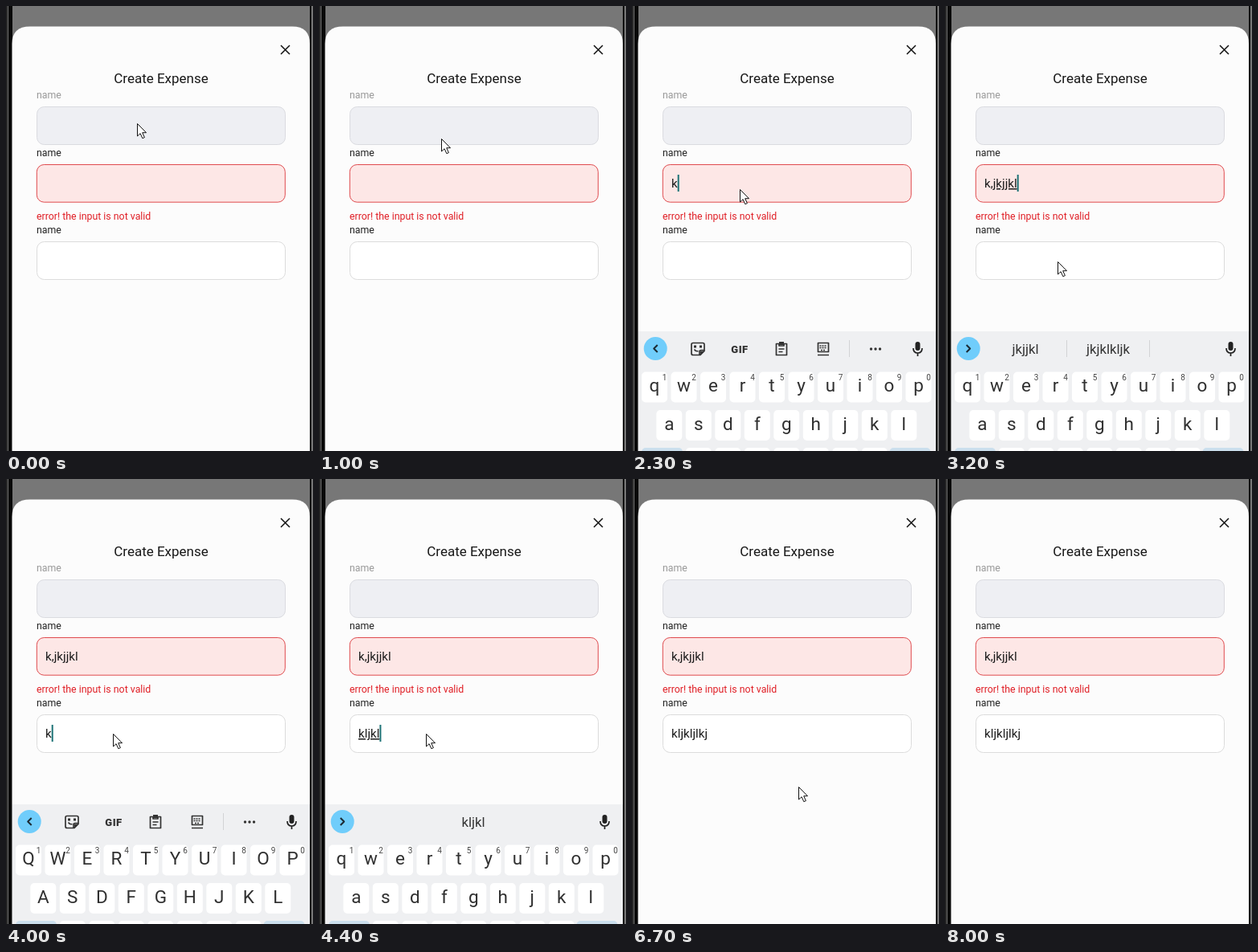
An HTML page for the animation above (8.5 s loop, 382 by 554 pixels).

```html
<!DOCTYPE html>
<html lang="en">
<head>
<meta charset="utf-8">
<title>Create Expense</title>
<style>
  html, body { margin: 0; width: 100%; height: 100%; overflow: hidden; }
  svg { display: block; width: 382px; height: 554px; font-family: Roboto, sans-serif; font-size: 12.35px; }
  .field { rx: 9px; stroke-width: 1; }
  .input { font-size: 15.2px; fill: #1c1c1c; }
  .composing { text-decoration: underline 1px; }
  .mid { text-anchor: middle; }
  .letters { font-size: 22.5px; fill: #303030; }
  .digits { font-size: 10px; fill: #444; }
  .hint { font-size: 16.8px; fill: #333; }
  .line { fill: none; stroke: #333; stroke-width: 1.7; stroke-linejoin: round; }
</style>
</head>
<body>
<svg viewBox="0 0 382 554">
  <rect width="382" height="554" fill="#777"/>
  <rect width="8" height="554" fill="#080808"/>
  <rect width="1.5" height="554" fill="#303030"/>
  <rect x="2" width="1" height="554" fill="#777"/>
  <path d="M7.500 554V47Q7.500 25.500 30 25.500H356Q378 25.500 378 47V554Z" fill="#fcfcfc"/>
  <rect x="378" width="2" height="554" fill="#111"/>

  <path d="M342 49l11 11m0-11l-11 11" class="line" style="stroke:#111;stroke-width:1.500"/>
  <text x="193" y="96" class="mid" font-size="17" fill="#181818">Create Expense</text>
  <g fill="#222">
    <text x="38" y="114.5" fill="#999">name</text>
    <text x="38" y="186.5">name</text>
    <text x="38" y="265.5" fill="#e01f26">error! the input is not valid</text>
    <text x="38" y="282.5">name</text>
  </g>
  <rect class="field" x="38.5" y="125.5" width="309" height="47" fill="#eeeff3" stroke="#dadbe0"/>
  <rect class="field" x="38.3" y="197.5" width="309" height="46.7" fill="#fde7e6" stroke="#df4a4e"/>
  <rect class="field" x="38.5" y="293.5" width="309" height="47" fill="#fff" stroke="#dcdcdc"/>
  <text class="input" x="49" y="226"><tspan></tspan><tspan></tspan></text>
  <text class="input" x="49" y="322"><tspan></tspan><tspan></tspan></text>
  <rect id="caret" width="2" height="21" fill="#1d7376"/>

  <g id="keyboard">
    <rect x="8" y="405" width="370" height="150" fill="#eff0f2"/>
    <circle cx="29.2" cy="426.5" r="14.5" fill="#70cdfb"/>
    <path id="chevron" class="line" d="M2.500 -4.500l-4.500 4.500 4.500 4.500" style="stroke:#1c2a33;stroke-width:2"/>
    <g id="tools">
      <path class="line" d="M76 419.500h12q2 0 2 2v8l-5 5h-9q-2 0-2-2v-11q0-2 2-2zM90 428.500h-4q-2 0-2 2v4M77.500 427.500q2 3 5 2"/>
      <path d="M77 422.500h3v3h-3zM84 422.500h3v3h-3zM85 434.500v-5h5z" fill="#333"/>
      <text x="134" y="431.5" class="mid" font-size="13" font-weight="900" letter-spacing=".5" fill="#333">GIF</text>
      <path class="line" d="M179.500 420.500h13v14h-13zM183 420v3h6v-3M182.500 427h7M182.500 430.500h5"/>
      <path d="M183 418h6v4h-6z" fill="#333"/>
      <path class="line" d="M231.500 419.500h13v11h-13zM231 434.500h14"/>
      <path class="line" stroke-dasharray="2 1" d="M233.500 423h9M233.500 425.500h9M235 428.500h6"/>
      <path d="M270.500 416v21" stroke="#d2d3d5"/>
      <path d="M297.500 427h.01m5.500 0h.01m5.500 0h.01" stroke="#333" stroke-width="3.400" stroke-linecap="round"/>
    </g>
    <g id="hints" class="hint mid">
      <path d="M151.500 416v21M254.500 416v21" stroke="#d2d3d5"/>
      <text y="433"></text>
      <text x="203" y="433">jkjklkljk</text>
    </g>
    <rect x="352.500" y="418" width="6" height="11" rx="3" fill="#222"/>
    <path class="line" d="M350 426q0 6 5.500 6t5.500-6M355.500 432v4" style="stroke:#222"/>
    <g id="keys"></g>
    <g id="letters" class="letters mid"></g>
    <g id="digits" class="digits mid"></g>
  </g>
  <path id="pointer" d="M.5 .5V16l3.600-3.300 2.700 6 2.600-1.100-2.700-5.900h4.800z" fill="#fff" stroke="#111"/>
</svg>
<script>
const $ = id => document.getElementById(id);
const inputs = document.querySelectorAll('.input');
const hintTexts = $('hints').querySelectorAll('text');
const LOOP = 8500, STEP = 100, PITCH = 36.5;
const HIDDEN = 160;

function add(parent, tag, attrs, text = '') {
  const node = document.createElementNS('http://www.w3.org/2000/svg', tag);
  for (const name in attrs) node.setAttribute(name, attrs[name]);
  node.textContent = text;
  parent.append(node);
}

function addKey(x, y, width, fill) {
  add($('keys'), 'rect', { x, y, width, height: 38, rx: 5, fill });
}

[['qwertyuiop', 28, 455.5], ['asdfghjkl', 46.3, 503], ['zxcvbnm', 82.8, 550]].forEach(([row, left, y], r) => {
  [...row].forEach((letter, i) => {
    const x = left + i * PITCH;
    addKey(x - 16, y, 32, '#fff');
    add($('letters'), 'text', { x, y: y + 24.8 }, letter);
    if (!r) add($('digits'), 'text', { x: x + 12.5, y: y + 10 }, (i + 1) % 10);
  });
});
addKey(12, 550, 51, '#cbdfed');
addKey(320.5, 550, 51, '#cbdfed');

// Each list holds [start time, ...values]; the latest started entry applies.
const pointerStops = [
  [0, 163, 146], [800, 155, 147], [1000, 152, 165], [1100, 145, 202], [1200, 141, 221],
  [1500, 135, 228], [2300, 134, 228], [3000, 138, 265], [3100, 143, 317], [3200, 140, 318],
  [3400, 133, 317], [4900, 165, 345], [5000, 191, 367], [6700, 207, 383],
  [6800, 70, 160], [6900, -50, -50]
];
const keyboardStops = [
  [0, HIDDEN], [1500, 125], [1600, 67], [1700, 18], [1800, 0], [5700, 75], [5800, HIDDEN]
];
const at = (stops, t) => stops.filter(stop => stop[0] <= t).pop().slice(1);
const typed = (text, start, t) => text.slice(0, Math.max(0, (t - start) / STEP + 1));
const show = (node, visible) => node.style.display = visible ? '' : 'none';

function draw(t) {
  const second = t >= 3400;
  const values = [typed('k,jkjjkl', 2300, t), typed('kljkljlkj', 4000, t)];
  const active = second ? 1 : 0;
  const word = values[active].split(',').pop();
  const suggesting = word.length > 1;
  const composing = suggesting && t < 5700;

  inputs.forEach((input, i) => {
    const [before, current] = input.children;
    const split = values[i].length - (i === active && composing ? word.length : 0);
    before.textContent = values[i].slice(0, split);
    current.textContent = values[i].slice(split);
    current.setAttribute('class', 'composing');
  });

  show($('caret'), t >= 1500 && t < 5000 && !(t >= 2000 && t < 2300));
  $('caret').setAttribute('x', 49 + inputs[active].getComputedTextLength());
  $('caret').setAttribute('y', second ? 306 : 210);

  show($('tools'), !suggesting);
  show($('hints'), suggesting);
  show($('hints').firstElementChild, !second);
  show(hintTexts[1], !second);
  hintTexts[0].textContent = word;
  hintTexts[0].setAttribute('x', second ? 192 : 100);
  $('chevron').setAttribute('transform', `translate(29.2 426.5) scale(${suggesting ? -1 : 1} 1)`);

  const upper = t < 2300 || (t >= 3500 && t < 4100);
  $('letters').style.textTransform = upper ? 'uppercase' : 'none';
  $('keyboard').setAttribute('transform', `translate(0 ${at(keyboardStops, t)})`);
  $('pointer').setAttribute('transform', `translate(${at(pointerStops, t)})`);
}

const start = performance.now();
function tick() {
  const t = (performance.now() - start) % LOOP;
  draw(Math.floor(t / STEP) * STEP);
  requestAnimationFrame(tick);
}
tick();
</script>
</body>
</html>
```
